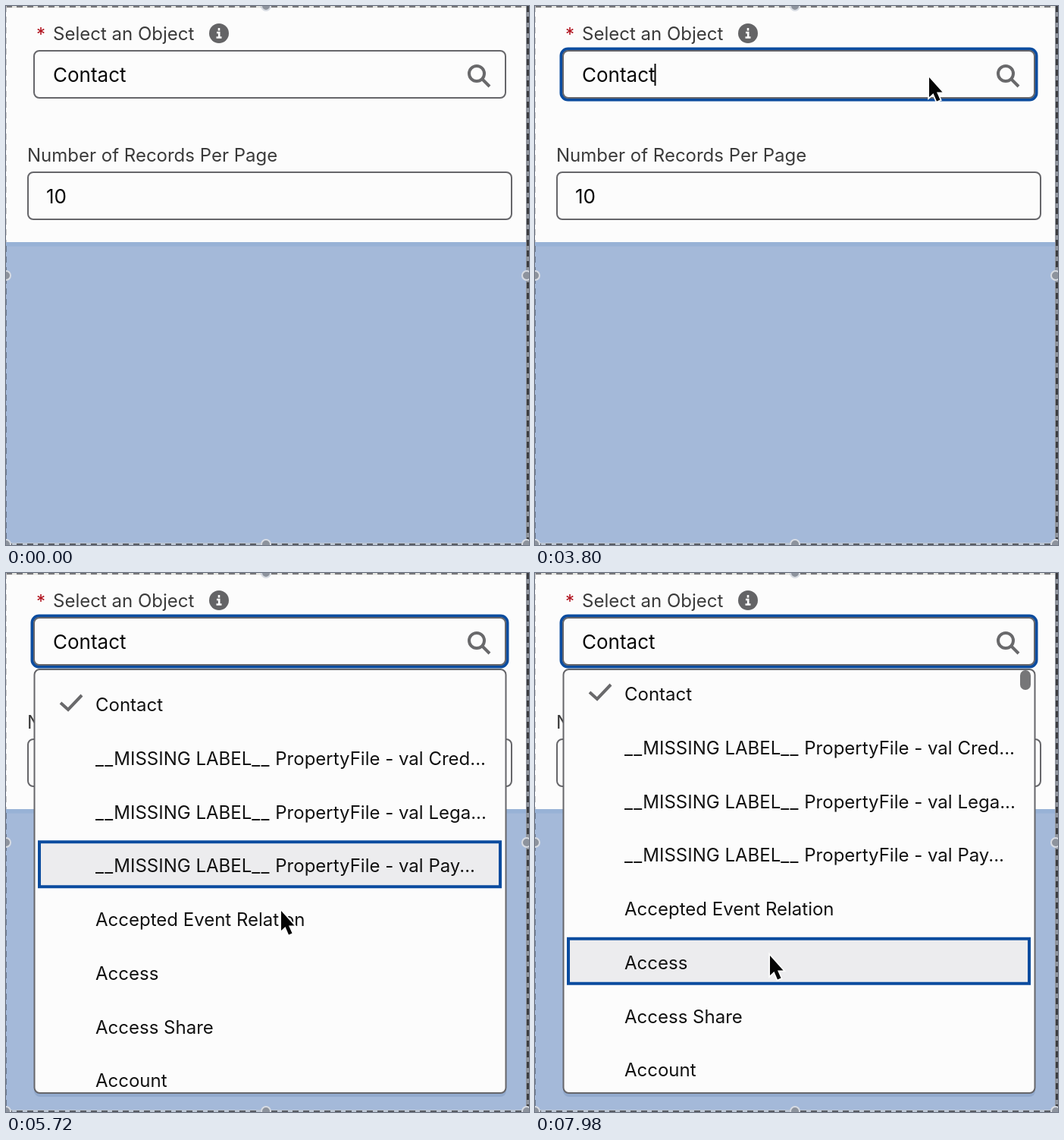
Write an HTML page that moves like this. It is 690x710 px and loops after 8 s.

```html
<!DOCTYPE html>
<html lang="en">
<head>
<meta charset="utf-8">
<title>Object picker</title>
<style>
  html, body { margin: 0; width: 100%; height: 100%; overflow: hidden; background: #fcfcfc; }
  svg { display: block; width: 690px; height: 710px; }
  text { font: 24px Inter, Roboto, sans-serif; fill: #111; white-space: pre; }
  .label { fill: #3a3a3a; }
  .value { font-size: 26px; fill: #080808; }
  .wide { letter-spacing: 1.2px; }
  .box { fill: #fcfcfc; stroke: #66666a; stroke-width: 2; }
  .icon { fill: none; stroke: #69696b; stroke-width: 4; }
  .blue { stroke: #0b4c9f; stroke-width: 4; }
  .handle { fill: #8d939d; stroke: #d8dce3; stroke-width: 2; }
</style>
</head>
<body>
<svg viewBox="0 0 690 710">
  <defs>
    <clipPath id="clip"><rect x="38" y="127" width="621" height="558" rx="6"/></clipPath>
  </defs>
  <rect width="690" height="710" fill="#fcfcfc"/>
  <rect y="313" width="690" height="397" fill="#a4b9d9"/>
  <rect y="311" width="690" height="5.5" fill="#98b2d6"/>

  <text x="40" y="46" style="fill:#b0101c">*</text>
  <text class="label" x="62" y="45">Select an Object</text>
  <circle cx="281" cy="36" r="13" fill="#646466"/>
  <path d="M281 29v3.4M278 35h3.2v6M277.500 41.500h7" fill="none" stroke="#fcfcfc" stroke-width="2.600"/>
  <rect id="ring" class="blue" x="34.500" y="56.500" width="627" height="67" rx="9" fill="none"/>
  <rect class="box" x="37" y="59" width="622" height="62" rx="7"/>
  <text class="value" x="62" y="100">Contact</text>
  <path id="caret" d="M158.500 76v29" stroke="#080808" stroke-width="2"/>
  <path class="icon" d="M628.500 96.500L638 106"/>
  <circle class="icon" cx="621" cy="89" r="10"/>

  <text class="label" x="28" y="205">Number of Records Per Page</text>
  <rect class="box" x="29" y="219" width="638" height="62" rx="7"/>
  <text class="value" x="53" y="260">10</text>

  <g id="menu">
    <rect x="37" y="130" width="623" height="560" rx="8" fill="#8ba5ca" opacity=".75"/>
    <rect class="box" x="37.500" y="127" width="622" height="558" rx="7"/>
    <g clip-path="url(#clip)">
      <g id="list">
        <rect id="hover" class="blue" x="44" width="608" height="59" fill="#ececee"/>
        <path class="icon" d="M72 171l10 9L100 161"/>
      </g>
    </g>
    <rect id="thumb" x="640" y="128" width="14" height="26" rx="7" fill="#767678"/>
  </g>

  <g fill="none">
    <path d="M0 1H690" stroke="#e6e6e2" stroke-width="3"/>
    <path d="M0 1H690" stroke="#77777a" stroke-width="2" stroke-dasharray="8 6"/>
    <path d="M.5 0V311" stroke="#c6c6c8" stroke-dasharray="8 6"/>
    <path d="M.5 316V710" stroke="#6c7a90" stroke-dasharray="8 6"/>
    <path d="M688 0V710" stroke="#90959e" stroke-width="4"/>
    <path d="M688.500 0V710" stroke="#3c3d41" stroke-width="3" stroke-dasharray="8 6"/>
    <path d="M0 708.500H690" stroke="#bcc6d4" stroke-width="3"/>
    <path d="M0 709H690" stroke="#595d65" stroke-width="2" stroke-dasharray="8 6"/>
  </g>
  <g id="handles"></g>
  <path id="pointer" d="M1 1V27L6.500 22L11 32.500L15.500 30.500L11 20.500H18.500Z"
        fill="#050505" stroke="#fcfcfc" stroke-width="3.500" paint-order="stroke"/>
</svg>
<script>
const LOOP = 8000, PITCH = 70.75, TOP = 140;
const ENTER = 1840, FOCUS = 3400, OPEN = 4000, HOVER_LAG = 120;
const $ = id => document.getElementById(id);
const missing = "__MISSING LABEL__ PropertyFile - val ";
const rows = ["Contact", missing + "Cred...", missing + "Lega...", missing + "Pay...",
  "Accepted Event Relation", "Access", "Access Share", "Account", "Account Brand"];

function add(parent, tag, attrs) {
  const el = document.createElementNS("http://www.w3.org/2000/svg", tag);
  for (const key in attrs) el.setAttribute(key, attrs[key]);
  return parent.appendChild(el);
}
rows.forEach((name, i) => {
  const line = add($("list"), "text", { x: 118, y: 182 + i * PITCH });
  for (const part of name.split(/(__)/).filter(Boolean))
    add(line, "tspan", { class: part === "__" ? "wide" : "" }).textContent = part;
});
for (const [cx, cy] of [[343, 0], [0, 355], [687, 355], [343, 709], [0, 709], [687, 709]])
  add($("handles"), "circle", { class: "handle", cx, cy, r: 6 });

// Pointer stops: time, x, y
const path = [
  [ENTER, 560, 712], [2240, 524, 107], [2400, 524, 107], [3000, 519, 93],
  [5000, 519, 93], [5720, 362, 444], [7000, 351, 481], [7680, 351, 481], [7900, 309, 503]
];
const ease = p => { p = Math.min(1, Math.max(0, p)); return p * p * (3 - 2 * p); };

function pointerAt(t) {
  let i = 0;
  while (i < path.length - 2 && t >= path[i + 1][0]) i++;
  const [t0, x0, y0] = path[i], [t1, x1, y1] = path[i + 1];
  const p = ease((t - t0) / (t1 - t0));
  return [x0 + (x1 - x0) * p, y0 + (y1 - y0) * p];
}
const scrollAt = t => 14 * ease((t - 7680) / 220);
const show = (id, on) => $(id).setAttribute("visibility", on ? "visible" : "hidden");

function draw(t) {
  const [x, y] = pointerAt(t), scroll = scrollAt(t), seen = t - HOVER_LAG;
  const row = Math.max(0, Math.floor((pointerAt(seen)[1] + scrollAt(seen) - TOP) / PITCH));
  // The caret starts a new blink on focus and again when the menu opens
  const blink = (t - (t < OPEN ? FOCUS : OPEN)) % 1000;
  show("pointer", t >= ENTER);
  show("ring", t >= FOCUS);
  show("caret", t >= FOCUS && blink < 500);
  show("menu", t >= OPEN);
  show("thumb", t >= OPEN && scroll > 0);
  $("pointer").setAttribute("transform", `translate(${x} ${y})`);
  $("list").setAttribute("transform", `translate(0 ${-scroll})`);
  $("hover").setAttribute("y", TOP + 2 + row * PITCH);
}

const start = performance.now();
(function tick() {
  draw((performance.now() - start) % LOOP);
  requestAnimationFrame(tick);
})();
</script>
</body>
</html>
```
